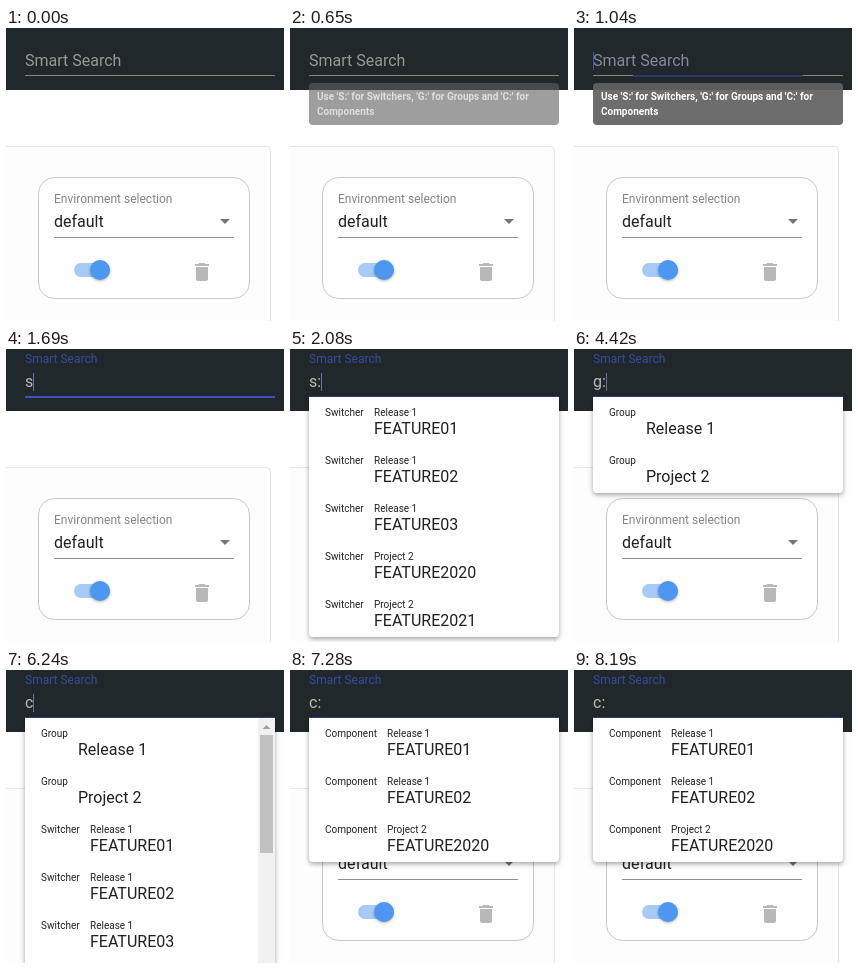
Write an HTML page with a canvas that moves like this. It is 278 px wide and 293 px high and loops after 8.32 s.

```html
<!DOCTYPE html>
<html lang="en">
<head>
<meta charset="utf-8">
<title>Smart Search</title>
<style>
  html, body { margin: 0; width: 100%; height: 100%; overflow: hidden; background: #fff; }
  canvas { display: block; width: 278px; height: 293px; }
</style>
</head>
<body>
<canvas id="stage"></canvas>
<script>
const W = 278, H = 293, LOOP = 8320, STEP = 130;
const FONT = 'Roboto, "Open Sans", sans-serif';
const BLUE = '#3f51b5', INK = '#212121';
const canvas = document.getElementById('stage');
const ctx = canvas.getContext('2d');
const dpr = window.devicePixelRatio || 1;
canvas.width = W * dpr;
canvas.height = H * dpr;

const groups = ['Release 1', 'Project 2'].map(name => ({ kind: 'Group', name }));
const entry = kind => ([parent, name]) => ({ kind, parent, name });
const switchers = [
  ['Release 1', 'FEATURE01'], ['Release 1', 'FEATURE02'], ['Release 1', 'FEATURE03'],
  ['Project 2', 'FEATURE2020'], ['Project 2', 'FEATURE2021']
].map(entry('Switcher'));
const components = [
  ['Release 1', 'FEATURE01'], ['Release 1', 'FEATURE02'], ['Project 2', 'FEATURE2020']
].map(entry('Component'));
const all = [...groups, ...switchers, ...components];

// [start, typed text, open list]
const typing = [
  [0, '', null], [1690, 's', null], [1820, 's', all], [2080, 's:', switchers],
  [2990, 's', all], [3120, '', all], [3250, '', null],
  [3770, 'g', all], [3900, 'g:', groups],
  [5200, 'g', all], [5330, '', all], [5460, '', null],
  [6240, 'c', all], [6370, 'c:', components]
];
// Times at which the caret toggles, starting hidden
const blinks = [1040, 1560, 1690, 2730, 3250, 4160, 4420, 4940, 5200, 5980, 6240, 6890, 7410, 7930];

const clamp = v => Math.max(0, Math.min(1, v));
const mix = (a, b, p) => a + (b - a) * p;

function rect(x, y, w, h, color) {
  ctx.fillStyle = color;
  ctx.fillRect(x, y, w, h);
}

function round(x, y, w, h, r) {
  ctx.beginPath();
  ctx.roundRect(x, y, w, h, r);
}

function text(str, x, y, size, color, weight = 400) {
  ctx.font = `${weight} ${size}px ${FONT}`;
  ctx.fillStyle = color;
  ctx.fillText(str, x, y);
}

function triangle(x, y, w, h, color) {
  ctx.fillStyle = color;
  ctx.beginPath();
  ctx.moveTo(x - w / 2, y);
  ctx.lineTo(x + w / 2, y);
  ctx.lineTo(x, y + h);
  ctx.fill();
}

function shadow(blur, dy, alpha) {
  ctx.shadowColor = `rgba(0,0,0,${alpha})`;
  ctx.shadowBlur = blur * dpr;
  ctx.shadowOffsetY = dy * dpr;
}

const bin = new Path2D('M6 19c0 1.1.9 2 2 2h8c1.1 0 2-.9 2-2V7H6v12zM19 4h-3.5l-1-1h-5l-1 1H5v2h14V4z');

function drawPage() {
  rect(0, 0, W, H, '#fefefe');
  round(-10.5, 118.5, 275, 200, 4);
  ctx.fillStyle = '#fdfdfd';
  ctx.fill();
  ctx.lineWidth = 1;
  ctx.strokeStyle = '#e6e6e6';
  ctx.stroke();

  round(32.5, 149.5, 211, 121, 16);
  ctx.fillStyle = '#fefefe';
  ctx.fill();
  ctx.strokeStyle = '#c8c8c8';
  ctx.stroke();
  text('Environment selection', 48, 175, 12, '#858585');
  text('default', 48, 199, 16, INK);
  triangle(219, 191, 10, 5, '#757575');
  rect(48, 209, 180, 1, '#8f8f8f');

  round(68, 235, 36, 14, 7);
  ctx.fillStyle = '#a6cbf6';
  ctx.fill();
  ctx.save();
  shadow(3, 1, 0.3);
  ctx.fillStyle = '#4e97f1';
  ctx.beginPath();
  ctx.arc(94, 242, 10, 0, Math.PI * 2);
  ctx.fill();
  ctx.restore();

  ctx.save();
  ctx.translate(184, 232);
  ctx.fillStyle = '#b8b8b8';
  ctx.fill(bin);
  ctx.restore();
  rect(0, 0, W, 62, '#21282b');
}

function drawField(t, value) {
  const focused = t >= 1040;
  const p = 1 - (1 - clamp((t - 1040) / 400)) ** 3;
  const color = p > 0 ? '#394a9f' : focused ? '#85889a' : '#969897';
  text('Smart Search', 19, mix(38, 14, p), mix(16, 12, p), color);

  rect(19, 47, 250, 1, '#858684');
  if (focused) {
    const w = t < 1170 ? 170 : 250;
    rect(144 - w / 2, 47, w, 2, t < 1170 ? '#303a68' : BLUE);
  }
  text(value, 19, 38, 16, '#b9bbbb');
  if (blinks.filter(b => b <= t).length % 2) {
    const x = 19 + Math.round(ctx.measureText(value).width);
    rect(x, 24, 1, 18, value ? '#6670a8' : BLUE);
  }
}

function drawTooltip(t) {
  const p = t < 1300 ? clamp((t - 480) / 260) : clamp((1560 - t) / 260);
  if (!p) return;
  ctx.save();
  ctx.globalAlpha = p;
  round(19, 55, 250, 42, 4);
  ctx.fillStyle = 'rgba(97,97,97,.92)';
  ctx.fill();
  text("Use 'S:' for Switchers, 'G:' for Groups and 'C:' for", 27, 72, 10, '#fff', 700);
  text('Components', 27, 87, 10, '#fff', 700);
  ctx.restore();
}

function drawPanel(items) {
  const height = Math.min(items.length * 48, 256);
  ctx.save();
  shadow(5, 2, 0.35);
  round(19, 48, 250, height, [0, 0, 4, 4]);
  ctx.fillStyle = '#fff';
  ctx.fill();
  ctx.restore();
  rect(19, 47, 250, 1, '#2d3a7c');

  items.forEach((item, i) => {
    const y = 48 + i * 48;
    if (y > H) return;
    text(item.kind, 35, y + 19, 10, INK);
    const x = 45 + Math.round(ctx.measureText(item.kind).width);
    if (item.parent) text(item.parent, x, y + 19, 10, INK);
    text(item.name, x, y + 37, 16, INK);
  });

  if (items.length * 48 > height) {
    rect(252, 48, 17, height, '#f1f1f1');
    triangle(260.5, 59, 8, -4, '#a0a0a0');
    rect(254, 65, 13, 118, '#c1c1c1');
  }
}

function draw(now) {
  const t = Math.floor((now % LOOP) / STEP) * STEP;
  const [, value, list] = typing.filter(s => s[0] <= t).pop();
  ctx.setTransform(dpr, 0, 0, dpr, 0, 0);
  drawPage();
  drawField(t, value);
  drawTooltip(t);
  if (list) drawPanel(list);
}

const start = performance.now();
function tick() {
  draw(performance.now() - start);
  requestAnimationFrame(tick);
}
tick();
</script>
</body>
</html>
```
